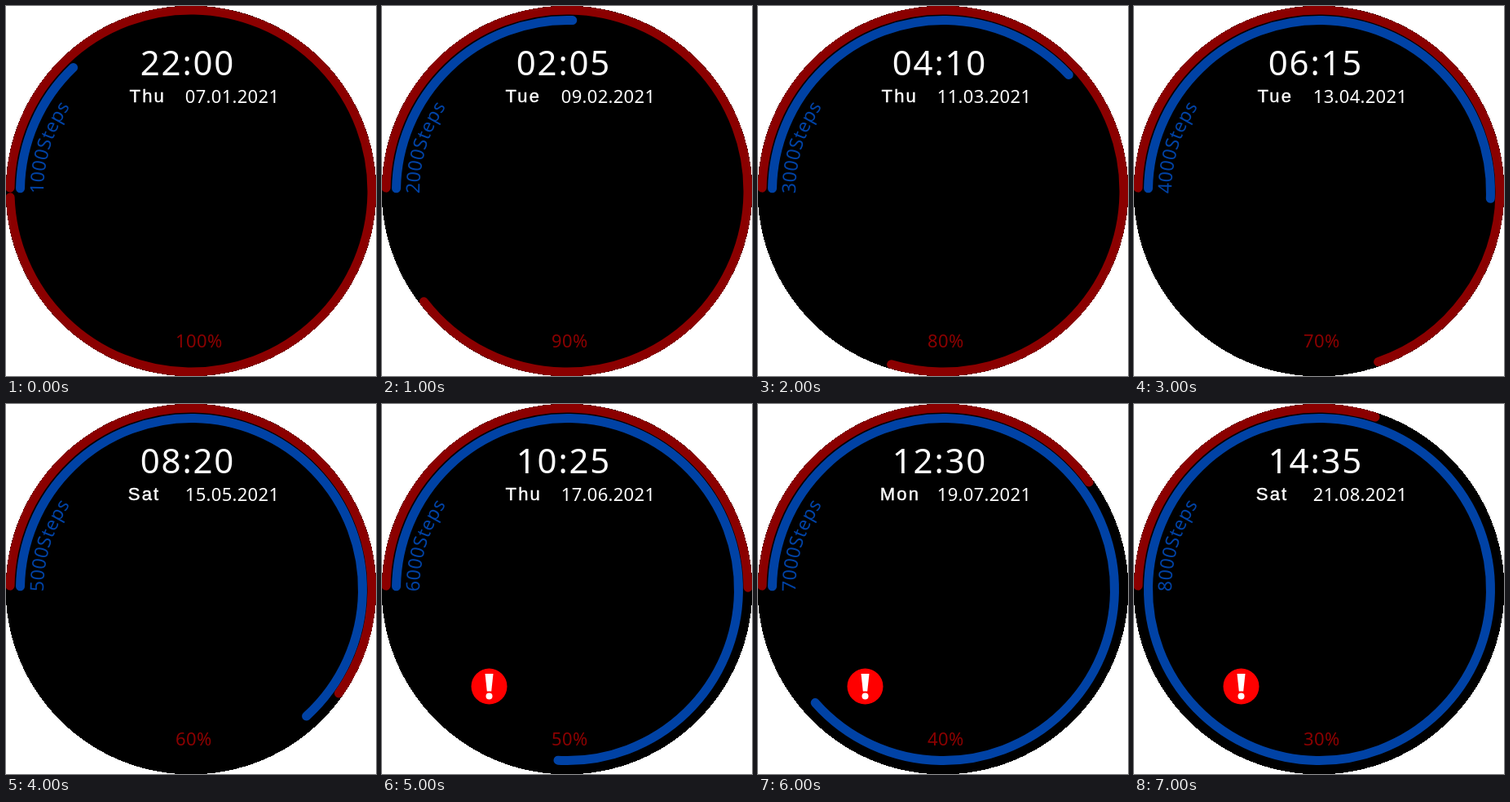
Recreate the animation shown at these times as an HTML page. Size 454x454 px, loop 8000 ms.

```html
<!DOCTYPE html>
<html lang="en">
<head>
<meta charset="utf-8">
<title>Watch face</title>
<style>
html, body { margin: 0; width: 100%; height: 100%; overflow: hidden; background: #fff; }
svg { display: block; width: 454px; height: 454px; }
text { font: 22px "Noto Sans", sans-serif; fill: #fff; white-space: pre; }
.ring { fill: none; stroke-width: 11; stroke-linecap: round; }
#time { font-size: 42px; letter-spacing: 1.8px; }
#date { letter-spacing: .3px; }
#day { font-family: "Liberation Sans", Arial, sans-serif; letter-spacing: 2.2px; stroke: #fff; stroke-width: .45px; }
#level { fill: #8b0000; letter-spacing: .4px; }
#steps { font-size: 23px; fill: #0042a5; letter-spacing: .2px; }
</style>
</head>
<body>
<svg viewBox="0 0 454 454">
  <defs>
    <path id="curve" d="M46 230.3A181.5 181.5 0 0 1 227.5 46"/>
  </defs>
  <rect width="454" height="454"/>
  <circle id="battery" class="ring" cx="227" cy="227" r="222" pathLength="360" stroke="#8b0000" transform="rotate(181 227 227)"/>
  <circle id="goal" class="ring" cx="227.5" cy="227.5" r="210" pathLength="360" stroke="#0042a5" transform="rotate(181 227.5 227.5)"/>
  <!-- white corners around the round face -->
  <path d="M-9 -9H463V463H-9ZM-.5 227a227.5 227.5 0 0 0 455 0a227.5 227.5 0 0 0 -455 0Z" fill="#fff" fill-rule="evenodd" shape-rendering="crispEdges"/>
  <text id="time" x="164.8" y="85"></text>
  <text id="day" y="118"></text>
  <text id="date" x="219.8" y="119"></text>
  <text id="level" x="208" y="419"></text>
  <text id="steps"><textPath id="stepText" href="#curve"></textPath></text>
  <g id="alert">
    <circle cx="131.5" cy="346.5" r="22" fill="#f00"/>
    <path d="M126.5 331H136.5L134.2 352.5H128.8Z" fill="#fff"/>
    <circle cx="131.5" cy="358.5" r="4" fill="#fff"/>
  </g>
</svg>
<script>
const STEP = 1000;
const days = ["Thu", "Tue", "Thu", "Tue", "Sat", "Thu", "Mon", "Sat"];
const $ = id => document.getElementById(id);
const pad = n => String(n).padStart(2, "0");
const sweep = (id, degrees) => $(id).setAttribute("stroke-dasharray", `${degrees} 400`);
let shown = -1;

function show(i) {
  const day = days[i], tenths = 10 - i;
  $("time").textContent = `${pad(i ? 2 * i : 22)}:${pad(5 * i)}`;
  $("day").textContent = day;
  $("day").setAttribute("x", day[0] === "T" ? 151.5 : 149.8);
  $("date").textContent = `${pad(7 + 2 * i)}.${pad(i + 1)}.2021`;
  $("level").textContent = `${tenths * 10}%`;
  $("stepText").textContent = `${(i + 1) * 1000}Steps`;
  sweep("battery", tenths * 35.7);
  sweep("goal", (i + 1) * 45.36);
  $("alert").style.display = tenths <= 5 ? "" : "none";
}

const start = performance.now();
function tick() {
  const i = Math.floor((performance.now() - start) / STEP) % days.length;
  if (i !== shown) show(shown = i);
  requestAnimationFrame(tick);
}
tick();
</script>
</body>
</html>
```
